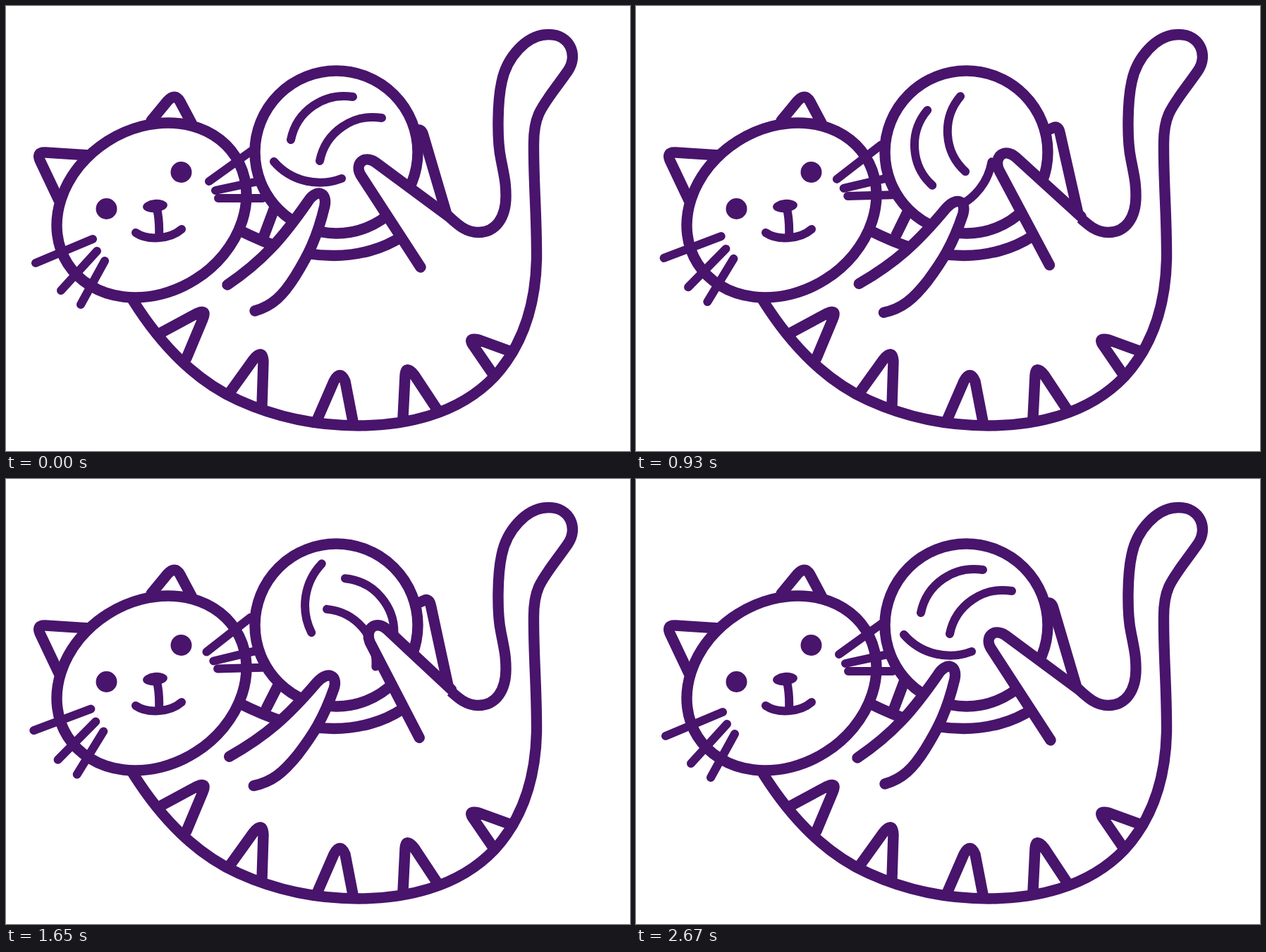
Recreate the animation shown at these times as an HTML page. Size 885 by 632 pixels, loop 2700 ms.

```html
<!DOCTYPE html>
<html lang="en">
<head>
<meta charset="utf-8">
<title>Cat with yarn</title>
<style>
  html, body { margin: 0; width: 100%; height: 100%; overflow: hidden; background: #fff; }
  svg { display: block; width: 100%; height: 100%; }
  .line { fill: none; stroke: #49146c; stroke-width: 15.4; stroke-linecap: round; stroke-linejoin: round; }
  .thin { stroke-width: 12; }
  .solid { fill: #fff; }
  .dot { fill: #49146c; }
</style>
</head>
<body>
<svg viewBox="0 0 885 632">
  <g class="line">
    <!-- body, tail and stripes -->
    <path d="M180 418C225 490 275 535 330 560C385 585 445 596 500 596C562 596 640 582 693 526C733 482 751 424 752.5 360C753 300 748 250 748.5 195C748.5 150 762 142 797 92C812 70 800 40.5 770 40.5C738 40.5 710 73 703 108C697 135 696 190 702 218C707 243 709 252 709 270C709 300 695 321.5 670 321.5C652 321.5 640 310 628 299"/>
    <path d="M218 465L270 437Q286 429 279 445L256 500M318 548L351 502Q364 486 365 505L363 568M442 586L465 533Q474 516 481 533L492 590M563 585L566 525Q567 509 579 524L612 574M714 490L670 474Q653 470 664 484L690 522"/>
    <path d="M330 318C370 338 410 354.5 465 354.5C500 354.5 535 345 562 327"/>
    <!-- far limbs -->
    <path d="M381 286L366 326" data-to="M387 293L370 325"/>
    <path d="M565 186L580 178Q589 172 592 184L625 296" data-to="M575 180L594 172Q602 168 604 180L627 292"/>
    <!-- head -->
    <path d="M118 212L56 208Q43 207 48 219L75 276M206 163L229 135Q240 123 247 136L263 166"/>
    <ellipse class="solid" rx="141.2" ry="116.3" transform="translate(206.5 290) rotate(-32.5)"/>
    <path class="thin" d="M214 288Q218 305 217 328M184 322C200 333 232 332 249 317"/>
    <path class="thin"
      d="M123 331L42 365M129 348L78 404M140 362L106 424M288 249L352 203M297 262L362 248M301 273L364 273"
      data-to="M120 326L39 356M127 344L73 398M138 358L100 419M284 245L346 196M294 258L360 242M300 269L364 267"/>
    <!-- yarn -->
    <circle class="solid" cx="468.5" cy="207.5" r="115.5"/>
    <path id="yarn" class="thin" d="M404 190A77 77 0 0 1 492 129M445 220A77 77 0 0 1 533 159M380 221A86 86 0 0 0 476 245"/>
    <!-- near limbs -->
    <path class="solid"
      d="M314 396C364 362 392 330 428 278C440 259 456 264 452 284C441 330 428 355 410 384C393 411 378 426 353 433"
      data-to="M317 394C370 365 402 337 443 290C458 274 473 280 467 299C451 343 435 366 414 393C393 418 377 431 351 436"/>
    <path class="solid"
      d="M588 371L503 240C494 224 508 211 524 222L628 299"
      data-to="M586 367L518 231C510 210 528 198 543 213L632 299"/>
  </g>
  <g class="dot">
    <circle cx="142.5" cy="288" r="15"/>
    <circle cx="248.5" cy="236" r="15"/>
    <ellipse rx="17.5" ry="9" transform="translate(211.5 284) rotate(-6)"/>
  </g>
</svg>
<script>
  const LOOP = 2700;
  const yarn = document.getElementById('yarn');
  const numbers = text => text.match(/[\d.]+/g).map(Number);

  const limbs = [...document.querySelectorAll('[data-to]')].map(path => {
    const shape = path.getAttribute('d');
    return { path, shape, from: numbers(shape), to: numbers(path.dataset.to) };
  });

  const cubicInOut = p => p < 0.5 ? 4 * p ** 3 : 1 - 4 * (1 - p) ** 3;

  function draw(now) {
    const p = (now % LOOP) / LOOP;
    const push = (1 - Math.cos(2 * Math.PI * p)) / 2;
    yarn.setAttribute('transform', `rotate(${-360 * cubicInOut(p)} 469.4 208)`);
    for (const { path, shape, from, to } of limbs) {
      let i = 0;
      path.setAttribute('d', shape.replace(/[\d.]+/g, () => {
        const value = from[i] + (to[i] - from[i]) * push;
        i++;
        return value.toFixed(2);
      }));
    }
  }

  const start = performance.now();
  function tick() {
    draw(performance.now() - start);
    requestAnimationFrame(tick);
  }
  tick();
</script>
</body>
</html>
```
